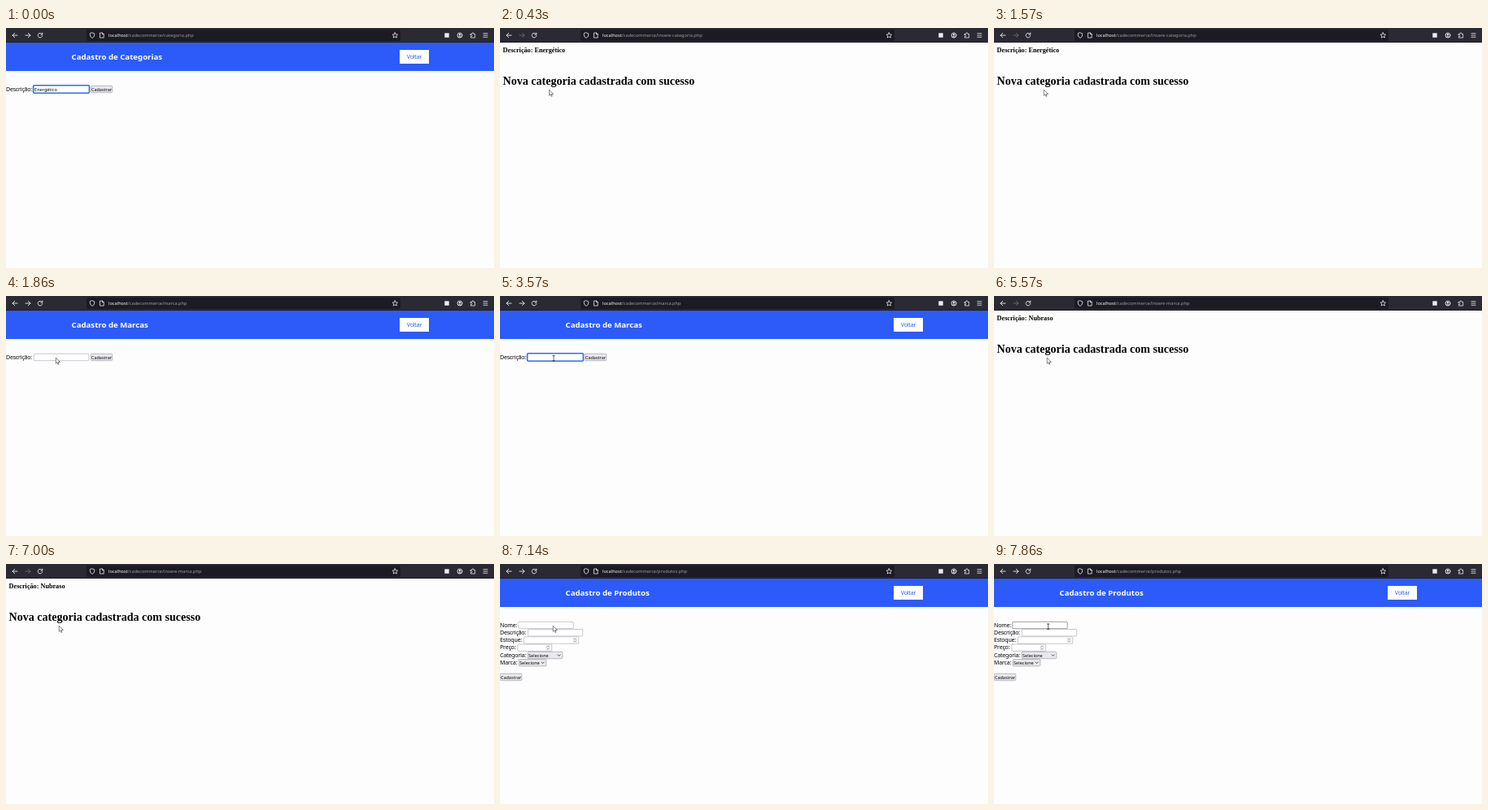
Recreate the animation shown at these times as an HTML page with a canvas. Size 600 by 296 pixels, loop 8000 ms.

```html
<!DOCTYPE html>
<html lang="pt-BR">
<head>
<meta charset="utf-8">
<title>Cadastro</title>
<style>
  html, body { margin: 0; width: 100%; height: 100%; overflow: hidden; background: #fdfdfe; }
  canvas { display: block; width: 600px; height: 296px; }
</style>
</head>
<body>
<canvas id="stage"></canvas>
<script>
const W = 600, H = 296, LOOP = 8000;
const canvas = document.getElementById('stage');
const ctx = canvas.getContext('2d');
const ratio = window.devicePixelRatio || 1;
canvas.width = W * ratio;
canvas.height = H * ratio;

const SANS = '"Noto Sans", "Open Sans", sans-serif';
const SERIF = '"Liberation Serif", "Noto Serif", serif';
const BLUE = '#2d5bfa', PAGE = '#fdfdfe', ICON = '#ececf0';
const BRAND = 'Nubraso';
const KEY_TIMES = [3860, 4000, 4290, 4430, 4710, 4860, 5000];

function text(str, x, y, font, color = '#000', spacing = 0) {
  ctx.font = font;
  ctx.fillStyle = color;
  ctx.letterSpacing = spacing + 'px';
  ctx.fillText(str, x, y);
  return ctx.measureText(str).width;
}

function rect(x, y, w, h, color) {
  ctx.fillStyle = color;
  ctx.fillRect(x, y, w, h);
}

function box(x, y, w, h, r, fill, stroke, line = 0.6) {
  ctx.beginPath();
  ctx.roundRect(x, y, w, h, r);
  if (fill) { ctx.fillStyle = fill; ctx.fill(); }
  if (stroke) { ctx.strokeStyle = stroke; ctx.lineWidth = line; ctx.stroke(); }
}

function path(d, x, y, color, line = 0.9, fill) {
  const p = new Path2D(d);
  ctx.save();
  ctx.translate(x, y);
  if (fill) { ctx.fillStyle = fill; ctx.fill(p); }
  ctx.strokeStyle = color;
  ctx.lineWidth = line;
  ctx.lineJoin = ctx.lineCap = 'round';
  ctx.stroke(p);
  ctx.restore();
}

const label = (str, y) => text(str, 0, y, '7px ' + SANS, '#000', -0.18);
const small = (str, x, y) => text(str, x, y, '5.5px ' + SANS);

function toolbar(file, canForward) {
  rect(0, 0, W, 18, '#2b2a33');
  rect(0, 17.4, W, 0.6, '#15141a');
  box(99, 2, 386, 14, 2, '#1c1b22');

  path('M3 0H-3M-.3-2.7L-3 0L-.3 2.7', 11, 9, ICON);
  path('M-3 0H3M.3-2.7L3 0L.3 2.7', 27, 9, canForward ? ICON : '#6b6a73');
  path('M2.4-1.4A2.8 2.8 0 1 0 2.8.5M2.8-3V-1H.8', 42, 9, ICON);
  path('M0-3.2L2.7-2.2V0Q2.4 2.2 0 3.4Q-2.4 2.2-2.7 0V-2.2Z', 106, 9, ICON, 0.8);
  path('M-2.2-3H.5L2.2-1.3V3H-2.2ZM.5-3V-1.3H2.2', 118, 9, ICON, 0.8);
  path('M0-3.3L1-1.1L3.3-.9L1.6.7L2.1 3L0 1.8L-2.1 3L-1.6.7L-3.3-.9L-1-1.1Z', 478.3, 9, ICON, 0.8);

  box(539.3, 6.3, 5.4, 5.4, 0, ICON);
  path('M3 0A3 3 0 1 1-3 0A3 3 0 1 1 3 0M-1.8 2.2Q0 .2 1.8 2.2', 558, 9, ICON, 0.9);
  ctx.beginPath();
  ctx.arc(558, 8.2, 1.2, 0, 7);
  ctx.fillStyle = ICON;
  ctx.fill();
  path('M-2.6-1.6H-1V-2.6Q0-3.8 1-2.6V-1.6H2.6V3H-2.6V1.5H-1.6Q-.6.6-1.6-.2H-2.6Z', 574, 9, ICON, 0.8);
  path('M-2.5-2.3H2.5M-2.5 0H2.5M-2.5 2.3H2.5', 589.5, 9, ICON, 0.8);

  const font = '5.62px ' + SANS;
  const w = text('localhost', 126, 11.2, font, '#fbfbfe');
  text('/cadecommerce/' + file, 126 + w, 11.2, font, '#9c9ba3');
}

function banner(title) {
  rect(0, 18, W, 35, BLUE);
  text(title, 80.5, 39.4, 'bold 9.65px ' + SANS, '#fff');
  rect(484, 27, 36, 17, '#fff');
  text('Voltar', 492.8, 38.1, '7px ' + SANS, BLUE, -0.18);
}

function field(x, y, w, state, value = '') {
  if (state === 'focus') {
    box(x - 0.4, y - 0.2, w + 0.8, 9.4, 1.2, '#fff', '#2f6fe0', 1.6);
  } else {
    box(x + 0.3, y + 0.3, w - 0.6, 8.4, 0.8, '#fff', state === 'hover' ? '#5c5c68' : '#a3a3ae');
  }
  small(value, x + 1.1, y + 6.6);
}

function button(x, y) {
  box(x + 0.3, y + 0.3, 26.4, 8.4, 1.2, '#e9e9ed', '#8f8f9d');
  small('Cadastrar', x + 0.9, y + 6.6);
}

function spinner(x, y) {
  rect(x - 2.5, y - 3.4, 5, 6.8, '#ebebee');
  path('M-1.1-1L0-2.1L1.1-1M-1.1 1L0 2.1L1.1 1', x, y, '#77777f', 0.6);
}

function select(x, y, w) {
  box(x + 0.3, y + 0.3, w - 0.6, 8.4, 1.2, '#e9e9ed', '#8f8f9d');
  small('Selecione', x + 1.3, y + 6.6);
  path('M-1.5-.7L0 .8L1.5-.7', x + w - 4.6, y + 4.6, '#222', 0.8);
}

function simpleForm(file, title, state, value) {
  toolbar(file, true);
  banner(title);
  label('Descrição:', 78);
  field(34, 71, 68, state, value);
  button(104, 71);
}

function productForm(state) {
  toolbar('produtos.php', true);
  banner('Cadastro de Produtos');
  ['Nome:', 'Descrição:', 'Estoque:', 'Preço:', 'Categoria:', 'Marca:']
    .forEach((name, i) => label(name, 77.8 + i * 9.2));
  field(22.5, 71, 68, state);
  field(34, 80.2, 68);
  field(29, 89.5, 68);
  spinner(92.3, 94);
  field(21.5, 98.7, 42.5);
  spinner(59, 103.2);
  select(33.8, 108, 43.4);
  select(22.8, 117.2, 34.4);
  button(0, 135);
}

function result(file, value) {
  toolbar(file, false);
  text('Descrição: ' + value, 3.6, 29.6, 'bold 8.2px ' + SERIF);
  text('Nova categoria cadastrada com sucesso', 3.6, 70.2, 'bold 14.05px ' + SERIF);
}

function arrow(x, y) {
  path('M0 0V6.7L1.6 5.3L2.7 7.8L3.8 7.3L2.7 4.9H4.8Z', x, y, '#333', 0.6, '#fff');
}

function ibeam(x, y) {
  path('M-1.2-3.2H1.2M0-3.2V3.2M-1.2 3.2H1.2', x, y, '#222', 0.7);
}

function draw(t) {
  ctx.setTransform(ratio, 0, 0, ratio, 0, 0);
  rect(0, 0, W, H, PAGE);

  if (t < 290) {
    simpleForm('categoria.php', 'Cadastro de Categorias', 'focus', 'Energético');
  } else if (t < 1860) {
    result('insere-categoria.php', 'Energético');
    arrow(t < 1000 ? 60.5 : 61.3, 76.6);
  } else if (t < 5570) {
    const typed = KEY_TIMES.filter(k => t >= k).length;
    const state = t < 2860 ? '' : t < 3000 ? 'hover' : 'focus';
    simpleForm('marca.php', 'Cadastro de Marcas', state, BRAND.slice(0, typed));
    if (t < 2860) arrow(61.3, 76.6);
    else if (!typed) ibeam(66, 76.8);
  } else if (t < 7140) {
    result('insere-marca.php', BRAND);
    arrow(65.2, 76.6);
  } else {
    const hover = t >= 7860;
    productForm(hover ? 'hover' : '');
    if (hover) ibeam(66.7, 77.2);
    else arrow(65.2, 76.6);
  }
}

const start = performance.now();
function tick() {
  draw((performance.now() - start) % LOOP);
  requestAnimationFrame(tick);
}
tick();
</script>
</body>
</html>
```
